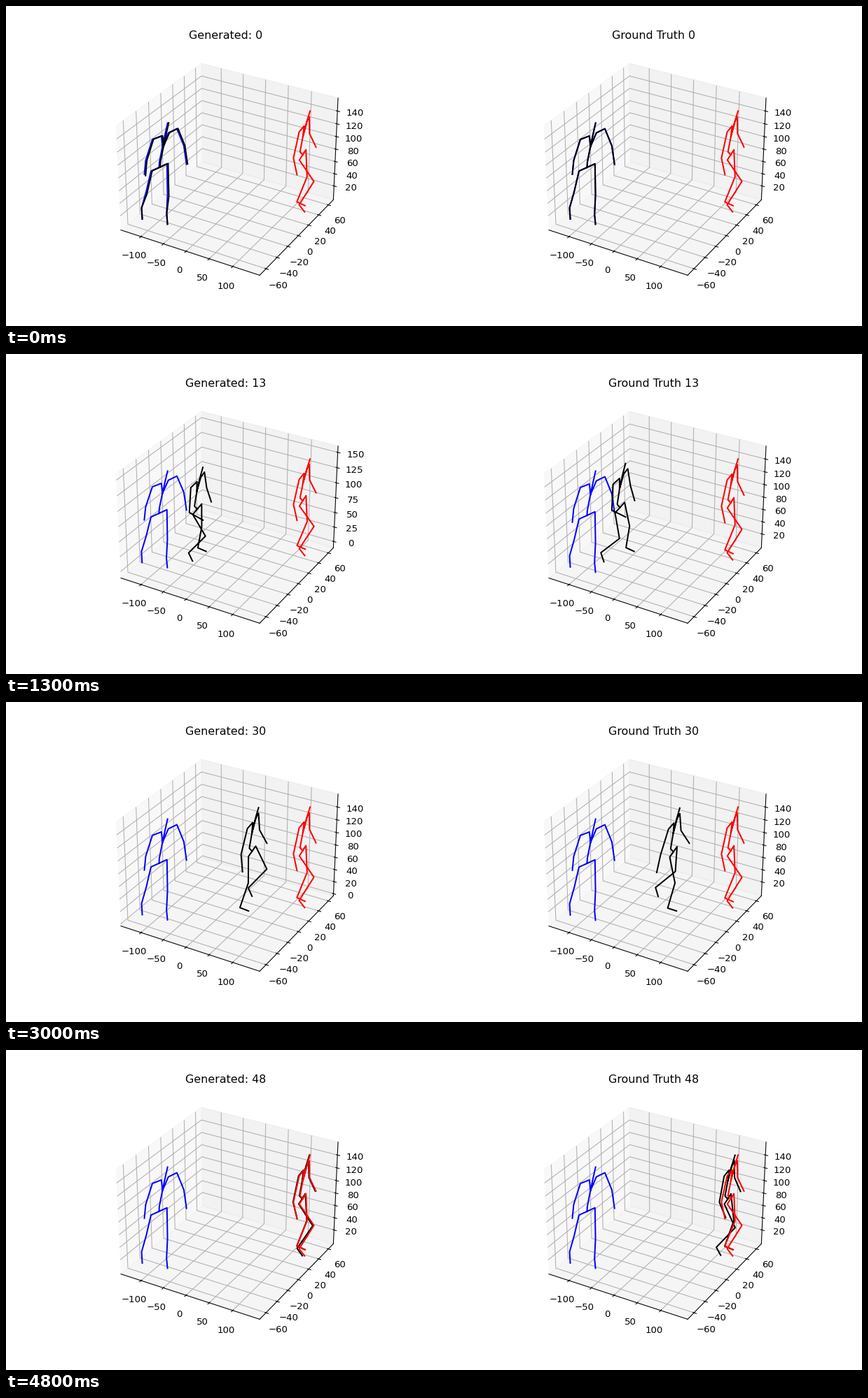
These frames come from a looping animation (1222x458 px, 4.9 s). A matplotlib script:

```python
import numpy as np
import matplotlib.pyplot as plt
from matplotlib.animation import FuncAnimation

W, H, DPI = 1222, 458, 95.46875
FRAMES, INTERVAL = 49, 100
SIDE = 0.77 * H
LEFT, GAP = 137.4, W / 2

LAST = 49                   # time at which the goal pose is reached
Z_HIGH, SOLE = 156.8, 0.25
THIGH, SHIN, FOOT = 43.5, 42.4, 15.6
UPPER_ARM, FOREARM = 33, 26

# Footholds of each foot: x, y, landing time, lift-off time.
RIGHT_STEPS = [(-128, -49, -60, 7), (42, 5, 23, 43), (170, 38, 52, 72)]
LEFT_STEPS = [(-76, -45, -1, 1), (-51, 3, 6, 25.5), (121, 45, 39.5, 58)]

GAP_POINT = np.full(3, np.nan)


def root_at(t):
    u = t / LAST
    x = -89 + 4.92 * (t - 6 * (1 - np.exp(-t / 6)))
    y = -46.7 + 82 * u + 6 * np.sin(np.pi * u)
    z = 87 + 3.5 * np.cos(2 * np.pi * (t - LAST) / 17)
    return np.array([x, y, z])


def toe_at(t, steps):
    """Place of the toe and pitch of the foot in degrees."""
    i = max(k for k, step in enumerate(steps) if step[2] <= t)
    x, y, land, leave = steps[i]
    here = np.array([x, y, SOLE])
    if t <= leave:
        u = (t - land) / (leave - land)
        return here, 20 + 60 * u ** 3
    x, y, land, _ = steps[i + 1]
    u = (t - leave) / (land - leave)
    there = np.array([x, y, SOLE])
    toe = here + (there - here) * u * u * (3 - 2 * u)
    toe[2] += 7 * np.sin(np.pi * u)
    return toe, 80 - 60 * u * u


def knee_between(hip, ankle, forward):
    """Two-bone joint that bends forward."""
    leg = ankle - hip
    dist = np.linalg.norm(leg)
    axis = leg / dist
    if dist >= THIGH + SHIN:
        return hip + leg * THIGH / (THIGH + SHIN)
    along = (THIGH ** 2 - SHIN ** 2 + dist ** 2) / (2 * dist)
    bend = forward - axis * (forward @ axis)
    bend /= np.linalg.norm(bend)
    return hip + axis * along + bend * np.sqrt(THIGH ** 2 - along ** 2)


def walker(t):
    """One 3D polyline through all bones, with gaps between the chains."""
    root = root_at(t)
    turn = np.exp(-(t / 9) ** 2)
    yaw = np.radians(21 - 53 * turn)
    fwd = np.array([np.cos(yaw), np.sin(yaw), 0])
    left = np.array([-np.sin(yaw), np.cos(yaw), 0])
    up = np.array([0, 0, 1])

    def body(f, l, u):
        return root + f * fwd + (l + 0.18 * turn * u) * left + u * up

    def swing(length, degrees, out):
        a = np.radians(degrees)
        return length * (np.sin(a) * fwd - np.cos(a) * up) + out * left

    def leg(side, steps):
        hip = root + 10.5 * side * left
        toe, pitch = toe_at(t, steps)
        p = np.radians(pitch)
        ankle = toe + FOOT * (np.sin(p) * up - np.cos(p) * fwd)
        return [root, hip, knee_between(hip, ankle, fwd), ankle, toe]

    def arm(side, upper, lower):
        shoulder = body(1, 16 * side, 47.5)
        elbow = shoulder + swing(UPPER_ARM, upper, 9 * side)
        hand = elbow + swing(FOREARM, lower, 2 * side)
        return [chest, body(3, 4.5 * side, 48), shoulder, elbow, hand]

    chest = body(-0.5, 0, 29)
    spine = [root, body(-4.5, 0, 5), chest, body(4.5, 0, 50), body(9.5, 0, 67)]
    beat = np.cos(2 * np.pi * (t - 41) / 29)
    flex = 24 + 48 * beat
    chains = [spine,
              arm(-1, 0.25 * flex - 10, flex), arm(1, -5, 22 - 10 * beat),
              leg(-1, RIGHT_STEPS), leg(1, LEFT_STEPS)]
    return np.array([p for chain in chains for p in (*chain, GAP_POINT)])


def generated(t):
    """The same walk, slightly ahead and sinking into the floor early on."""
    points = walker(t + 0.8 + 1.6 * np.sin(np.pi * t / 48) ** 2)
    points[:, 2] -= (7.4 * np.exp(-((t - 13) / 4.5) ** 2)
                     + 0.6 * np.sin(np.pi * t / 48))
    return points


START, END = walker(0), walker(LAST)

fig = plt.figure(figsize=(12.8, 4.798), dpi=DPI, facecolor="white")


class Panel:
    def __init__(self, title, shift, walk):
        self.title, self.walk = title, walk
        box = [(LEFT + shift) / W, 0.11, SIDE / W, 0.77]
        self.ax = fig.add_axes(box, projection="3d")
        self.lines = [self.ax.plot(*START.T, color=c)[0] for c in "bkr"]
        self.ax.set_xticks(range(-100, 101, 50))
        self.ax.set_yticks(range(-60, 61, 20))
        self.ax.set_xlim(-145.8, 156.2)
        self.ax.set_ylim(-71.2, 70.5)

    def update(self, t):
        figures = START, self.walk(t), END
        for line, points in zip(self.lines, figures):
            line.set_data_3d(*points.T)
        low = min(np.nanmin(points[:, 2]) for points in figures)
        span = Z_HIGH - low
        step = 20 if span <= 160 else 25
        first = int(np.ceil(low / step)) * step
        self.ax.set_zticks(np.arange(first, Z_HIGH, step))
        self.ax.set_zlim(low - span / 48, Z_HIGH + span / 48)
        # 3D axes scale the title height by 0.92
        self.ax.set_title(f"{self.title} {t}", y=1 / 0.92)


panels = [Panel("Generated:", 0, generated),
          Panel("Ground Truth", GAP, walker)]


def draw(t):
    for panel in panels:
        panel.update(t)
    return []


anim = FuncAnimation(fig, draw, frames=FRAMES, interval=INTERVAL,
                     init_func=lambda: draw(0), repeat=True, repeat_delay=0)
plt.show()
```
